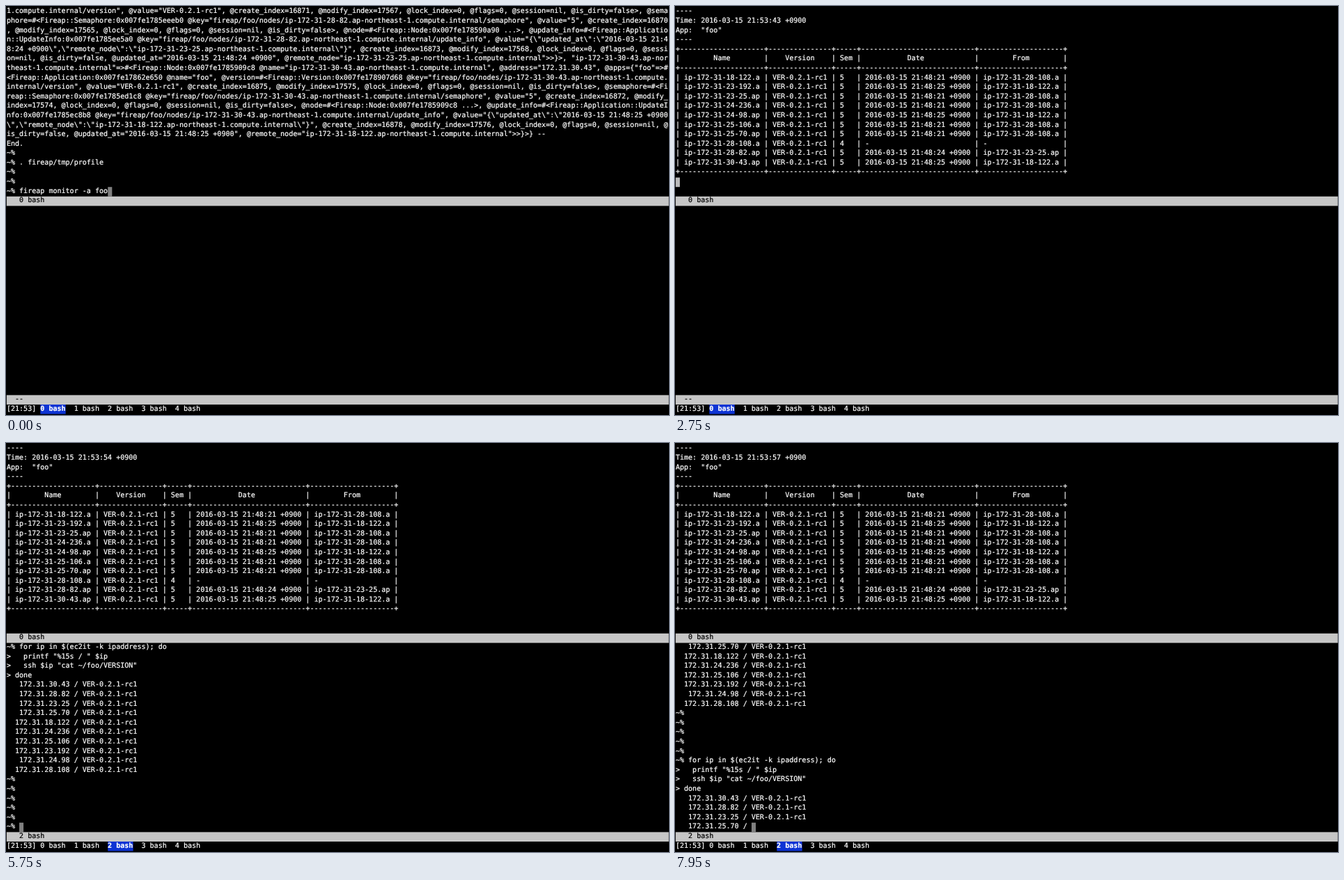
Animation, 952 px wide and 588 px high, one loop 8 s. Source, as an HTML page:

```html
<!DOCTYPE html>
<html lang="en">
<head>
<meta charset="utf-8">
<title>Terminal session</title>
<style>
  html, body { margin: 0; width: 100%; height: 100%; overflow: hidden; background: #000; }
  #stage { position: relative; width: 952px; height: 588px; overflow: hidden; }
  svg { position: absolute; left: 0; top: 0; }
  pre {
    position: absolute; left: .9px; margin: 0; white-space: pre; color: #fff;
    font: 10.06px/13.6px "DejaVu Sans Mono", "Liberation Mono", monospace;
    text-rendering: geometricPrecision; font-variant-ligatures: none;
    -webkit-text-stroke: .22px;
  }
  .bar { color: #000; }
</style>
</head>
<body>
<div id="stage">
  <svg width="952" height="588">
    <rect id="bar1" fill="#c6c6c6"/>
    <rect id="bar2" fill="#c6c6c6"/>
    <rect id="tab" fill="#0d33d4"/>
    <rect id="cursor"/>
  </svg>
  <pre id="top"></pre>
  <pre id="title" class="bar">   0 bash</pre>
  <pre id="bottom"></pre>
  <pre id="label" class="bar"></pre>
  <pre id="tabs"></pre>
</div>
<script>
const ROW = 13.6, COL = 6.056, LEFT = .9, TOP = 1.8, LOOP = 8000;
const $ = id => document.getElementById(id);

const log = String.raw`1.compute.internal/version", @value="VER-0.2.1-rc1", @create_index=16871, @modify_index=17567, @lock_index=0, @flags=0, @session=nil, @is_dirty=false>, @sema
phore=#<Fireap::Semaphore:0x007fe1785eeeb0 @key="fireap/foo/nodes/ip-172-31-28-82.ap-northeast-1.compute.internal/semaphore", @value="5", @create_index=16870
, @modify_index=17565, @lock_index=0, @flags=0, @session=nil, @is_dirty=false>, @node=#<Fireap::Node:0x007fe178590a90 ...>, @update_info=#<Fireap::Applicatio
n::UpdateInfo:0x007fe1785ee5a0 @key="fireap/foo/nodes/ip-172-31-28-82.ap-northeast-1.compute.internal/update_info", @value="{\"updated_at\":\"2016-03-15 21:4
8:24 +0900\",\"remote_node\":\"ip-172-31-23-25.ap-northeast-1.compute.internal\"}", @create_index=16873, @modify_index=17568, @lock_index=0, @flags=0, @sessi
on=nil, @is_dirty=false, @updated_at="2016-03-15 21:48:24 +0900", @remote_node="ip-172-31-23-25.ap-northeast-1.compute.internal">>}>, "ip-172-31-30-43.ap-nor
theast-1.compute.internal"=>#<Fireap::Node:0x007fe1785909c8 @name="ip-172-31-30-43.ap-northeast-1.compute.internal", @address="172.31.30.43", @apps={"foo"=>#
<Fireap::Application:0x007fe17862e650 @name="foo", @version=#<Fireap::Version:0x007fe178907d68 @key="fireap/foo/nodes/ip-172-31-30-43.ap-northeast-1.compute.
internal/version", @value="VER-0.2.1-rc1", @create_index=16875, @modify_index=17575, @lock_index=0, @flags=0, @session=nil, @is_dirty=false>, @semaphore=#<Fi
reap::Semaphore:0x007fe1785ed1c8 @key="fireap/foo/nodes/ip-172-31-30-43.ap-northeast-1.compute.internal/semaphore", @value="5", @create_index=16872, @modify_
index=17574, @lock_index=0, @flags=0, @session=nil, @is_dirty=false>, @node=#<Fireap::Node:0x007fe1785909c8 ...>, @update_info=#<Fireap::Application::UpdateI
nfo:0x007fe1785ec8b8 @key="fireap/foo/nodes/ip-172-31-30-43.ap-northeast-1.compute.internal/update_info", @value="{\"updated_at\":\"2016-03-15 21:48:25 +0900
\",\"remote_node\":\"ip-172-31-18-122.ap-northeast-1.compute.internal\"}", @create_index=16878, @modify_index=17576, @lock_index=0, @flags=0, @session=nil, @
is_dirty=false, @updated_at="2016-03-15 21:48:25 +0900", @remote_node="ip-172-31-18-122.ap-northeast-1.compute.internal">>}>} --
End.
~%
~% . fireap/tmp/profile
~%
~%
~% fireap monitor -a foo`.split("\n");

// Monitor table: host, seconds of the update, sending host
const WIDTHS = [18, 13, 3, 25, 18];
const hosts = [
  ["18-122", 21, "28-108"], ["23-192", 25, "18-122"], ["23-25", 21, "28-108"],
  ["24-236", 21, "28-108"], ["24-98", 25, "18-122"], ["25-106", 21, "28-108"],
  ["25-70", 21, "28-108"], ["28-108"], ["28-82", 24, "23-25"], ["30-43", 25, "18-122"]
];
const hostName = id => `ip-172-31-${id}.ap`.slice(0, 18);
const center = (s, w) => (" ".repeat((w - s.length) >> 1) + s).padEnd(w);
const tableRow = cells => "| " + cells.map((c, i) => c.padEnd(WIDTHS[i])).join(" | ") + " |";
const rule = "+" + WIDTHS.map(w => "-".repeat(w + 2)).join("+") + "+";
const table = [
  rule,
  tableRow(["Name", "Version", "Sem", "Date", "From"].map((s, i) => center(s, WIDTHS[i]))),
  rule,
  ...hosts.map(([id, sec, from]) => tableRow([
    hostName(id), "VER-0.2.1-rc1", sec ? "5" : "4",
    sec ? `2016-03-15 21:48:${sec} +0900` : "-", from ? hostName(from) : "-"
  ])),
  rule
];
const monitor = sec => ["----", `Time: 2016-03-15 21:53:${sec} +0900`, 'App:  "foo"', "----", ...table];

// Shell loop in the lower pane
const command = ["~% for ip in $(ec2it -k ipaddress); do", '>   printf "%15s / " $ip', '>   ssh $ip "cat ~/foo/VERSION"', "> done"];
const results = ["30.43", "28.82", "23.25", "25.70", "18.122", "24.236", "25.106", "23.192", "24.98", "28.108"]
  .map(ip => ("172.31." + ip).padStart(15) + " / VER-0.2.1-rc1");
const firstRun = [...command, ...results, ...Array(5).fill("~%")];

function shell(t) {
  if (t < 4740) return [];
  if (t < 6800) return [...firstRun, "~% "];
  const step = t < 7620 ? 0 : Math.min(4, 1 + Math.floor((t - 7620) / 110));
  const last = step ? results[step - 1].slice(0, 18) : "";
  return [...firstRun, ...command, ...results.slice(0, Math.max(0, step - 1)), last].slice(-20);
}

const ticks = [[1740, 42], [2750, 43], [3760, 44], [4740, 45], [5750, 54], [6800, 56], [7230, 57]];

function cursorAt(t, lines) {
  if (t < 1380) return [19, 24];
  if (t < 1740) return [19, 0];
  if (t < 3350) return [18, 0];
  return lines.length ? [40, lines.at(-1).length] : [21, 0];
}

// Places a rectangle on the character grid
function place(id, row, col, width) {
  const box = { x: LEFT + col * COL, y: TOP + row * ROW, width: width * COL, height: ROW };
  for (const key in box) $(id).setAttribute(key, box[key]);
}

function draw(t) {
  const lines = shell(t);
  const upper = t < 1380 ? log : t < 1740 ? log.slice(1) : monitor(ticks.findLast(k => k[0] <= t)[1]);
  $("top").textContent = upper.join("\n");
  $("bottom").textContent = lines.join("\n");

  place("cursor", ...cursorAt(t, lines), 1);
  $("cursor").setAttribute("fill", t >= 1740 && t < 3350 ? "#bbb" : "#808080");

  const tabs = [0, 1, 2, 3, 4].map(i => i + " bash");
  if (t >= 3350 && t < 4740) tabs.unshift("- ");
  const active = t < 4740 ? 0 : 2;
  place("tab", 42, 8 + active * 8, tabs[active].length);
  $("tabs").innerHTML = "[21:53] " + tabs.map((s, i) => i === active ? `<b>${s}</b>` : s).join("  ");
  $("label").textContent = t < 4740 ? "  --" : "   2 bash";
}

const panes = { top: 0, title: 20, bottom: 21, label: 41, tabs: 42 };
for (const id in panes) $(id).style.top = TOP - .4 + panes[id] * ROW + "px";
place("bar1", 20, 0, 157);
place("bar2", 41, 0, 157);

const start = performance.now();
function frame() {
  draw((performance.now() - start) % LOOP);
  requestAnimationFrame(frame);
}
frame();
</script>
</body>
</html>
```
